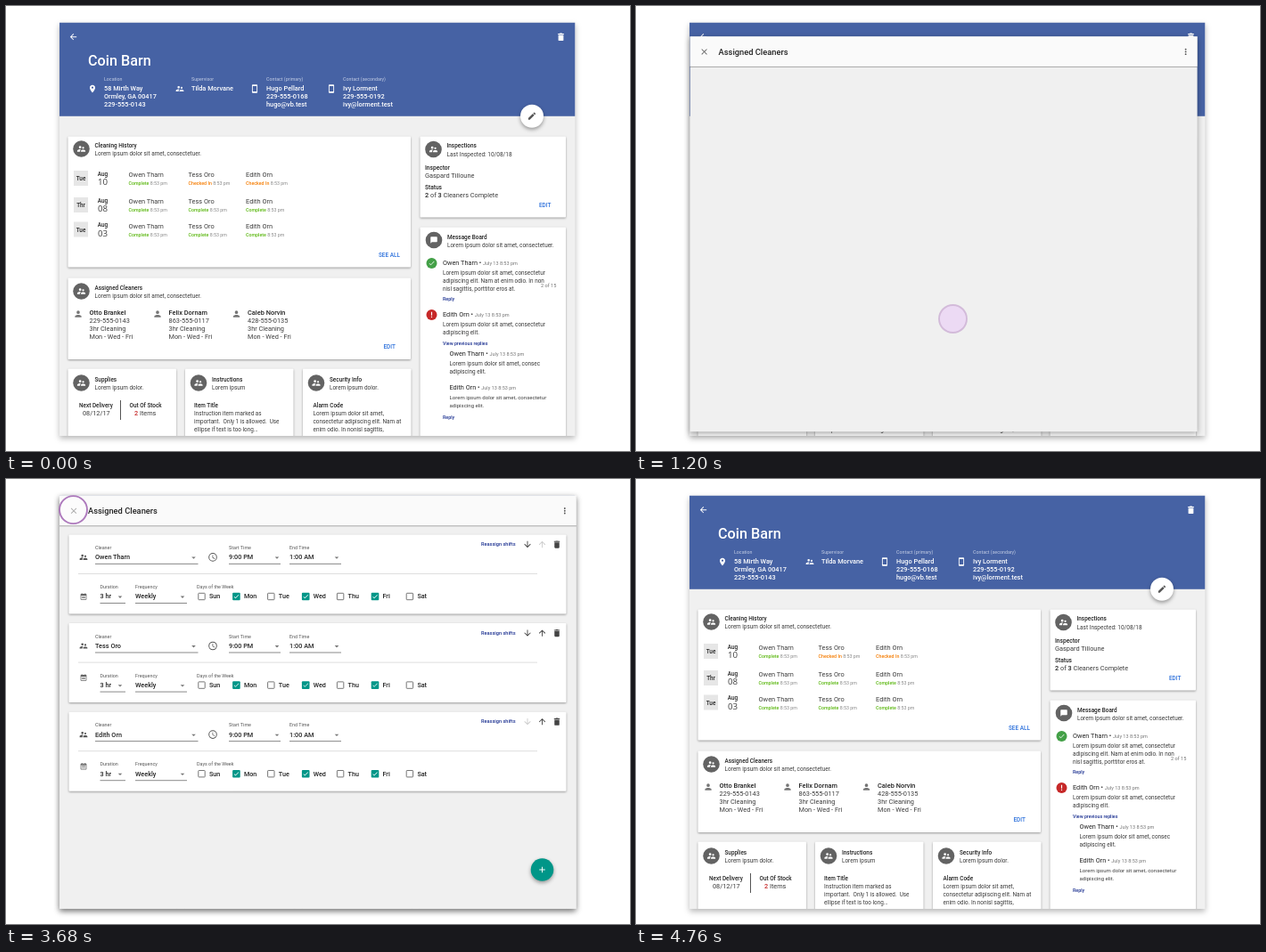
Animation, 700 px wide and 500 px high, one loop 4800 ms. Source, as an HTML page:

```html
<!DOCTYPE html>
<html lang="en">
<head>
<meta charset="utf-8">
<title>Assigned Cleaners</title>
<style>
html, body { margin: 0; width: 100%; height: 100%; overflow: hidden; background: #fff; }
svg { display: block; width: 700px; height: 500px; font-family: Roboto, sans-serif; }
text { white-space: pre; }
.card { fill: #fff; filter: drop-shadow(0 1px 1px rgba(0,0,0,.36)); }
.window { filter: drop-shadow(0 3px 3px rgba(0,0,0,.28)); }
.sheet { filter: drop-shadow(0 2px 3px rgba(0,0,0,.36)); }
.bar { filter: drop-shadow(0 1px .7px rgba(0,0,0,.3)); }
.fab { filter: drop-shadow(0 2px 2px rgba(0,0,0,.38)); }
</style>
</head>
<body>
<svg id="stage" viewBox="0 0 700 500"></svg>
<script>
const INK = '#3c3c3c', DARK = '#222', GRAY = '#757575', LINK = '#2a6fdb', NAVY = '#1c3191',
  TEAL = '#009688', BLUE = '#4662a4', PAGE = '#f0f0f0';

const ICON = {
  back: 'M20 11H7.83l5.59-5.59L12 4l-8 8 8 8 1.41-1.41L7.83 13H20z',
  trash: 'M6 19c0 1.1.9 2 2 2h8c1.1 0 2-.9 2-2V7H6zM19 4h-3.5l-1-1h-5l-1 1H5v2h14z',
  place: 'M12 2C8.13 2 5 5.13 5 9c0 5.25 7 13 7 13s7-7.75 7-13c0-3.87-3.13-7-7-7zm0 9.5a2.5 2.5 0 0 1 0-5 2.5 2.5 0 0 1 0 5z',
  people: 'M16.5 12a2.5 2.5 0 0 0 0-5 2.5 2.5 0 0 0 0 5zM9 11a3 3 0 0 0 0-6 3 3 0 0 0 0 6zm7.5 3c-1.83 0-5.5.92-5.5 2.75V19h11v-2.25c0-1.83-3.67-2.75-5.5-2.75zM9 13c-2.33 0-7 1.17-7 3.5V19h7v-2.25c0-.85.33-2.34 2.37-3.47C10.5 13.1 9.66 13 9 13z',
  phone: 'M17 1H7C5.9 1 5 1.9 5 3v18c0 1.1.9 2 2 2h10c1.1 0 2-.9 2-2V3c0-1.1-.9-2-2-2zm0 18H7V5h10z',
  pencil: 'M3 17.25V21h3.75L17.81 9.94l-3.75-3.75zM20.71 7.04a1 1 0 0 0 0-1.41l-2.34-2.34a1 1 0 0 0-1.41 0l-1.83 1.83 3.75 3.75z',
  person: 'M12 12a4 4 0 0 0 0-8 4 4 0 0 0 0 8zm0 2c-2.67 0-8 1.34-8 4v2h16v-2c0-2.66-5.33-4-8-4z',
  chat: 'M20 2H4a2 2 0 0 0-2 2v18l4-4h14a2 2 0 0 0 2-2V4a2 2 0 0 0-2-2z',
  check: 'M9 16.17L4.83 12l-1.42 1.41L9 19 21 7l-1.41-1.41z',
  bang: 'M10.4 3h3.2v11h-3.2zM10.4 17h3.2v3.4h-3.2z',
  close: 'M19 6.41L17.59 5 12 10.59 6.41 5 5 6.41 10.59 12 5 17.59 6.41 19 12 13.41 17.59 19 19 17.59 13.41 12z',
  more: 'M12 8a2 2 0 0 0 0-4 2 2 0 0 0 0 4zm0 2a2 2 0 0 0 0 4 2 2 0 0 0 0-4zm0 6a2 2 0 0 0 0 4 2 2 0 0 0 0-4z',
  clock: 'M12 2a10 10 0 0 0 0 20 10 10 0 0 0 0-20zm0 18a8 8 0 0 1 0-16 8 8 0 0 1 0 16zM12.5 7H11v6l5.2 3.2.8-1.3-4.5-2.7z',
  down: 'M20 12l-1.41-1.41L13 16.17V4h-2v12.17l-5.58-5.59L4 12l8 8z',
  up: 'M4 12l1.41 1.41L11 7.83V20h2V7.83l5.58 5.59L20 12l-8-8z',
  date: 'M19 4h-1V2h-2v2H8V2H6v2H5a2 2 0 0 0-2 2v14a2 2 0 0 0 2 2h14a2 2 0 0 0 2-2V6a2 2 0 0 0-2-2zm0 16H5V9h14zM7 11h10v2H7zm0 4h10v2H7z',
  caret: 'M7 10l5 5 5-5z',
  plus: 'M19 13h-6v6h-2v-6H5v-2h6V5h2v6h6z'
};

const text = (x, y, s, size = 6.4, fill = INK, weight = 400, more = '') =>
  `<text x="${x}" y="${y}" font-size="${size}" fill="${fill}" font-weight="${weight}" ${more}>${s}</text>`;
const bold = (x, y, s, size = 6.4, fill = DARK) => text(x, y, s, size, fill, 500);
const lines = (x, y, list, size, fill, weight) =>
  list.map((s, i) => text(x, y + 9 * i, s, size, fill, weight)).join('');
const rect = (x, y, w, h, fill, more = '') =>
  `<rect x="${x}" y="${y}" width="${w}" height="${h}" fill="${fill}" ${more}/>`;
const disc = (x, y, r, fill, more = '') => `<circle cx="${x}" cy="${y}" r="${r}" fill="${fill}" ${more}/>`;
const icon = (name, x, y, size, fill = '#666') =>
  `<path d="${ICON[name]}" fill="${fill}" transform="translate(${x - size / 2} ${y - size / 2}) scale(${size / 24})"/>`;
const span = (s, fill, size, weight = 400) =>
  `<tspan fill="${fill}" font-size="${size}" font-weight="${weight}">${s}</tspan>`;
const card = (x, y, w, h) => rect(x, y, w, h, '#fff', 'class="card" rx="1"');
const badge = (x, y, name = 'people') => disc(x, y, 9.3, '#636363') + icon(name, x, y, name === 'chat' ? 9 : 11, '#fff');
const heading = (x, y, title, sub, name) =>
  badge(x, y, name) + bold(x + 15, y - 1.5, title) + text(x + 15, y + 7.7, sub);

const LOREM = 'Lorem ipsum dolor sit amet, ';
const OWEN = 'Owen Tharn', TESS = 'Tess Oro', EDITH = 'Edith Orn';

function contact(x, glyph, label, list) {
  return icon(glyph, x - 13, 93, 10.5, '#fff') + text(x, 84, label, 5.3, '#c3cde4') +
    lines(x, 95.2, list, 7.35, '#fff', 500);
}

function header() {
  return rect(60, 18.5, 578.5, 105.3, BLUE) +
    icon('back', 75.5, 34.7, 11, '#fff') + icon('trash', 622.5, 34.8, 11.5, '#fff') +
    bold(92, 67, 'Coin Barn', 16.2, '#fff') +
    contact(110, 'place', 'Location', ['58 Mirth Way', 'Ormley, GA 00417', '229-555-0143']) +
    contact(208, 'people', 'Supervisor', ['Tilda Morvane']) +
    contact(292, 'phone', 'Contact (primary)', ['Hugo Pellard', '229-555-0168', 'hugo@vb.test']) +
    contact(378, 'phone', 'Contact (secondary)', ['Ivy Lorment', '229-555-0192', 'ivy@lorment.test']);
}

function visit(y, day, date, open) {
  const names = [OWEN, TESS, EDITH], xs = [137.5, 204.5, 269];
  return rect(76, y - 9, 16, 17, '#e6e6e6') +
    text(84, y + 2.3, day, 6.4, DARK, 500, 'text-anchor="middle"') +
    text(108.5, y - 3.3, 'Aug', 6.4, DARK, 500, 'text-anchor="middle"') +
    text(108.5, y + 7, date, 9.7, INK, 400, 'text-anchor="middle" font-family="Open Sans, sans-serif"') +
    names.map((n, i) => {
      const late = open && i > 0;
      return text(xs[i], y - 2, n, 7.4) +
        text(xs[i], y + 7, span(late ? 'Checked In' : 'Complete', late ? '#f57c00' : '#5cb811', 5.3, 500) +
          span(' 8:53 pm', '#888', 5.3));
    }).join('');
}

function worker(x, name, phone) {
  return icon('person', x - 12.5, 346, 11, '#757575') + bold(x, 347, name, 7.4) +
    lines(x, 356, [phone, '3hr Cleaning', 'Mon - Wed - Fri'], 7.35);
}

const post = (x, y, name) => text(x, y, span(name + ' • ', DARK, 7.3) + span('July 13 8:53 pm', GRAY, 5.5));

function dashboard() {
  const left =
    card(69.5, 146.5, 384.5, 147) + heading(84.5, 160.5, 'Cleaning History', LOREM + 'consectetuer.') +
    visit(194, 'Tue', '10', true) + visit(224, 'Thr', '08') + visit(251.5, 'Tue', '03') +
    bold(418, 282.3, 'SEE ALL', 6.4, LINK) +
    card(69.5, 305.5, 384.5, 91.5) + heading(84.5, 320.5, 'Assigned Cleaners', LOREM + 'consectetuer.') +
    worker(93.5, 'Otto Brankel', '229-555-0143') + worker(182.5, 'Felix Dornam', '863-555-0117') +
    worker(271, 'Caleb Norvin', '428-555-0135') + bold(423.5, 385.3, 'EDIT', 6.4, LINK);
  const bottom = [69.5, 201, 333].map(x => card(x, 407.5, 121.5, 90)).join('') +
    heading(84.5, 423.5, 'Supplies', 'Lorem ipsum dolor.') +
    bold(82, 451, 'Next Delivery') + text(86, 460.2, '08/12/17', 7.3) + rect(128, 443, 1, 22, '#555') +
    bold(138.5, 451, 'Out Of Stock') + text(144, 460.2, span('2', '#c62828', 7.3, 500) + ' Items', 7.3) +
    heading(216, 423.5, 'Instructions', 'Lorem ipsum') + bold(211, 451, 'Item Title') +
    lines(211, 460.3, ['Instruction item marked as', 'important.  Only 1 is allowed.  Use', 'ellipse if text is too long...'], 6.35) +
    heading(348, 423.5, 'Security Info', 'Lorem ipsum dolor.') + bold(344.5, 451, 'Alarm Code') +
    lines(344.5, 460.3, [LOREM.trim(), 'consectetur adipiscing elit. Nam at', 'enim odio. In nonisl sagittis,'], 6.4);
  const right =
    card(464.5, 146.5, 163.5, 91) + badge(479.5, 161) + bold(494.5, 159.2, 'Inspections') +
    text(494.5, 169, 'Last Inspected: 10/08/18', 6.5) +
    bold(470, 184, 'Inspector', 6.6) + text(470, 193.3, 'Gaspard Tilloune', 7.4) +
    bold(470, 206, 'Status', 6.6) +
    text(470, 215.2, span('2', DARK, 7.3, 500) + ' of ' + span('3', DARK, 7.3, 500) + ' Cleaners Complete', 7.3) +
    bold(598, 226.2, 'EDIT', 6.4, LINK) +
    card(464.5, 248.5, 163.5, 250) + heading(480, 263, 'Message Board', LOREM + 'consectetuer.', 'chat') +
    disc(477.5, 289, 6, '#43a047') + icon('check', 477.5, 289, 8, '#fff') + post(490, 291.3, OWEN) +
    lines(490, 302, [LOREM + 'consectetur', 'adipiscing elit. Nam at enim odio. In non', 'nisl sagittis, porttitor eros at.']) +
    text(600, 316.3, '2 of 15', 5.6, GRAY) + bold(490, 331, 'Reply', 5.3, NAVY) +
    disc(477.5, 347, 6, '#c62828') + icon('bang', 477.5, 347, 8.5, '#fff') + post(490, 349.2, EDITH) +
    lines(490, 360, [LOREM + 'consectetur', 'adipiscing elit.']) +
    bold(490, 381, 'View previous replies', 5.3, NAVY) + post(497.5, 393.2, OWEN) +
    lines(497.5, 404, [LOREM + 'consec', 'adipiscing elit.']) + post(497.5, 431.2, EDITH) +
    lines(497.5, 442.3, [LOREM + 'consectetur', 'adipiscing elit.'], 6.05) +
    bold(490, 464, 'Reply', 5.3, NAVY);
  return rect(60, 18.5, 578.5, 464.5, PAGE, 'class="window"') +
    `<g clip-path="url(#page)">${left}${bottom}${right}${header()}</g>` +
    disc(590, 123.7, 13, '#fff', 'class="fab"') + icon('pencil', 590, 123.7, 11, '#555');
}

// Drop-down field: label, value, underline and caret
const field = (x, y, w, label, value, caret) =>
  text(x, y - 9, label, 5.4, '#555') + bold(x, y + 2.4, value, 7.3) +
  rect(x, y + 7, w, 1, '#8a8a8a') + icon('caret', caret, y + 0.5, 11, '#777');

function shift(i, name) {
  const y = 62.5 + 99.6 * i, a = y + 25.4, b = y + 69.5;
  const days = ['Sun', 'Mon', 'Tue', 'Wed', 'Thu', 'Fri', 'Sat'].map((d, k) => {
    const x = 219.5 + 38.9 * k;
    const box = k % 2
      ? rect(x - 4.3, b - 4.3, 8.6, 8.6, TEAL, 'rx="1"') + icon('check', x, b, 7.5, '#fff')
      : rect(x - 3.7, b - 3.7, 7.4, 7.4, '#fff', 'stroke="#777" rx=".6"');
    return box + bold(x + 8.5, b + 2.4, d, 7.2);
  }).join('');
  return card(70.5, y, 558, 89) + icon('people', 87, a, 10.5, '#555') +
    field(100, a, 115.5, 'Cleaner', name, 210.5) + icon('clock', 232, a, 11.5, '#555') +
    field(250, a, 58, 'Start Time', '9:00 PM', 304) + field(318, a, 58, 'End Time', '1:00 AM', 371) +
    bold(533, y + 12.6, 'Reassign shifts', 5.6, NAVY) +
    icon('down', 585, y + 11, 11, i === 2 ? '#ccc' : '#444') + icon('up', 601.5, y + 11, 11, i === 0 ? '#ccc' : '#444') +
    icon('trash', 618, y + 11, 11, '#444') + rect(81, y + 43.5, 515, 1, '#dedede') +
    icon('date', 87, y + (i ? 61 : 69.5), 9, '#666') +
    field(105.5, b, 28.5, 'Duration', '3 hr', 128) + field(145, b, 58, 'Frequency', 'Weekly', 198) +
    text(214, b - 9, 'Days of the Week', 5.4, '#555') + days;
}

const stage = document.getElementById('stage');
stage.innerHTML =
  '<clipPath id="page"><rect x="60" y="18.5" width="578.5" height="464.5"/></clipPath>' + dashboard() +
  '<g id="panel">' + rect(0, 0, 1, 1, PAGE, 'id="sheet" class="sheet"') +
  rect(0, 0, 1, 34, '#fafafa', 'id="bar" class="bar"') +
  '<g id="title">' + icon('close', 16, 17.2, 11, '#666') + bold(32, 20.6, 'Assigned Cleaners', 9.3) + '</g>' +
  '<g id="menu">' + icon('more', -13, 17.2, 11, '#555') + '</g></g>' +
  '<g id="shifts">' + [OWEN, TESS, EDITH].map((n, i) => shift(i, n)).join('') +
  disc(601.5, 439, 12.8, TEAL, 'class="fab"') + icon('plus', 601.5, 439, 11, '#fff') + '</g>' +
  '<circle id="tap" r="15.5" stroke="#a063b2" stroke-opacity=".85" stroke-width="1.9"/>';

const el = id => document.getElementById(id);
const set = (id, attrs) => { for (const k in attrs) el(id).setAttribute(k, attrs[k]); };

// Value at time t from [time, value] steps, straight between them
function track(steps, t) {
  let i = steps.findIndex(s => s[0] > t);
  if (i < 0) return steps[steps.length - 1][1];
  if (i === 0) return steps[0][1];
  const [t0, v0] = steps[i - 1], [t1, v1] = steps[i];
  return v0 + (v1 - v0) * (t - t0) / (t1 - t0);
}
const ease = k => (1 - Math.cos(Math.PI * k)) / 2;
const mix = (a, b, k) => a + (b - a) * k;

const LOOP = 4800, TICK = 40;
const OPEN = [[944, 0], [1246, 1], [3674, 1], [3976, 0]];
const SHIFTS = [[1220, 0], [1420, 1], [3690, 1], [3770, 0]];
const TAP = [[600, 0], [760, 1], [1120, 1], [1260, 0], [3520, 0], [3640, 1], [3920, 1], [4080, 0]];
const PRESS = [[760, 0], [920, 1], [1260, 1], [1300, 0], [3680, 0], [3840, 1]];

function draw(t) {
  const k = track(OPEN, t), p = ease(k);
  const x = mix(70.5, 60, p), y = mix(304.5, 18.3, p);
  const w = mix(455.5, 640, p) - x, h = mix(398, 483, p) - y;
  const bar = y - 2.5 * (1 - p);
  set('panel', { opacity: Math.min(1, k * 4), display: k > 0 ? 'inline' : 'none' });
  set('sheet', { x, y, width: w, height: h });
  set('bar', { x, y, width: w, height: mix(30.5, 33.7, p) });
  set('title', { transform: `translate(${x} ${bar})` });
  set('menu', { transform: `translate(${x + w} ${bar})` });

  const s = track(SHIFTS, t);
  set('shifts', { opacity: s, display: s > 0 ? 'inline' : 'none' });

  const f = track(PRESS, t), first = t < 2400;
  const rgb = [230, 168, 255].map(c => Math.round(mix(255, c, f)));
  set('tap', {
    cx: first ? 355.5 : 75.5, cy: first ? 351.5 : 34.6, opacity: track(TAP, t),
    fill: `rgb(${rgb})`, 'fill-opacity': mix(.45, .7, f)
  });
}

const start = performance.now();
function frame() {
  const t = (performance.now() - start) % LOOP;
  draw(Math.floor(t / TICK) * TICK);
  requestAnimationFrame(frame);
}
frame();
</script>
</body>
</html>
```
